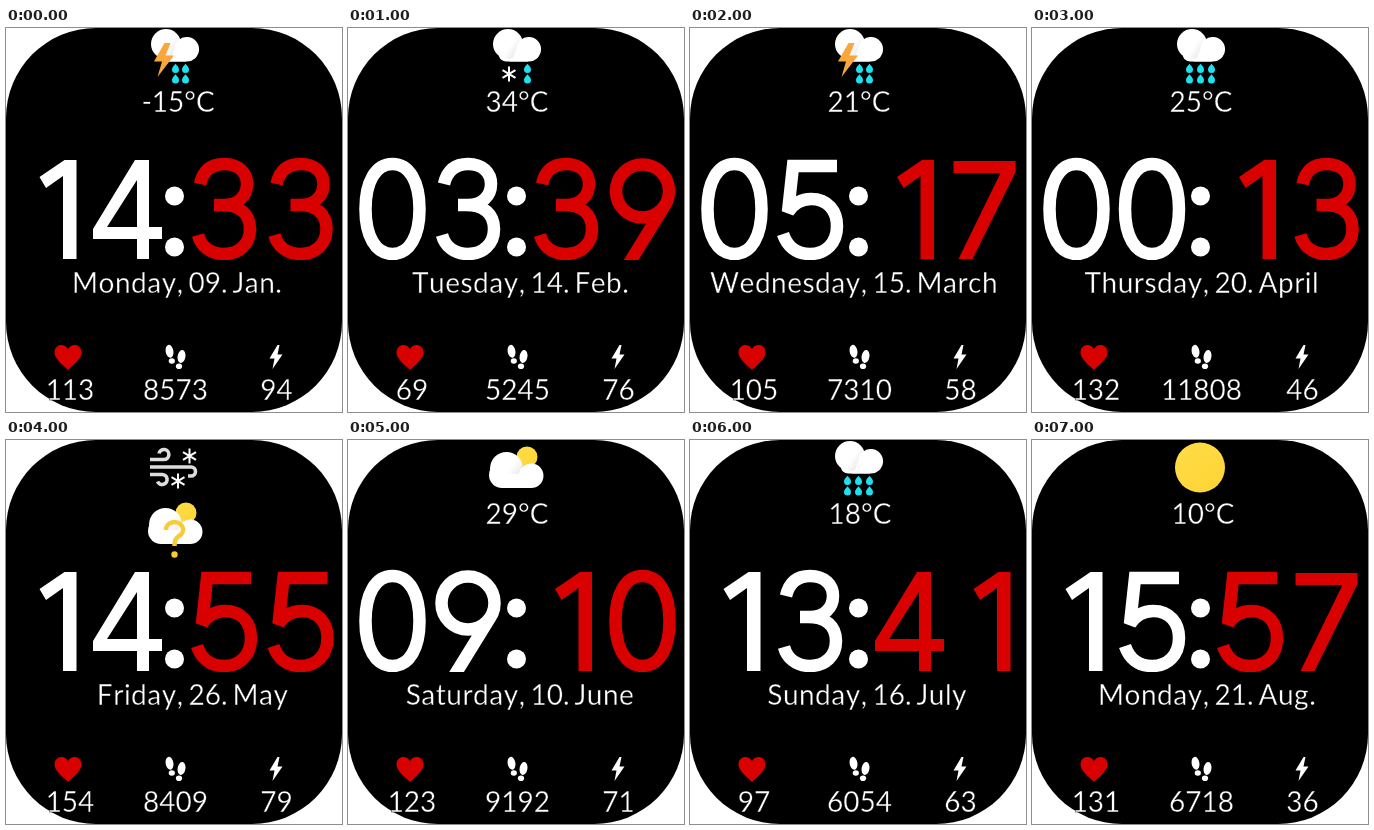
Write an HTML page that moves like this. It is 336 px wide and 384 px high and loops after 8000 ms.

```html
<!DOCTYPE html>
<html lang="en">
<head>
<meta charset="utf-8">
<title>Watch face</title>
<style>
  html, body { margin: 0; width: 100%; height: 100%; overflow: hidden; background: #fff; }
  svg { display: block; width: 336px; height: 384px; }
  /* the black outline thins the strokes a little */
  text { font: 28px Lato, sans-serif; font-kerning: none; fill: #fff; stroke: #000; stroke-width: .35px; }
  .mid { text-anchor: middle; }
  .end { text-anchor: end; }
  .word { letter-spacing: .5px; }
  .line { fill: none; stroke: currentColor; stroke-width: 12.5; }
  .solid { fill: currentColor; fill-rule: evenodd; }
  .state { visibility: hidden; animation: show 8s step-end infinite; }
  @keyframes show {
    0% { visibility: visible; }
    12.5%, 100% { visibility: hidden; }
  }
</style>
</head>
<body>
<svg viewBox="0 0 336 384">
  <defs>
    <linearGradient id="sun" x1="0" y1="0" x2="1" y2="1">
      <stop offset="0" stop-color="#ffdd48"/><stop offset="1" stop-color="#fdd433"/>
    </linearGradient>
    <linearGradient id="puff" x1="0" y1="0" x2="1" y2=".7">
      <stop offset=".65" stop-color="#fff"/><stop offset="1" stop-color="#e4e4e4"/>
    </linearGradient>
    <clipPath id="band"><rect y="128" width="336" height="104"/></clipPath>
    <path id="drop" d="M0-4.8C1.6-2.8 3.5-1.2 3.5 1A3.5 3.5 0 0 1-3.5 1C-3.5-1.2-1.6-2.8 0-4.8Z" fill="#1ce2f0"/>
    <path id="flake" d="M0-7.5V7.5M-6.5-3.8 6.5 3.8M-6.5 3.8 6.5-3.8" stroke="#fff" stroke-width="2"/>
    <g id="cloud">
      <path d="M158 18h22v15.5h-22a8 8 0 0 1-7-5z" fill="#fff"/>
      <circle cx="160" cy="16" r="15" fill="url(#puff)"/>
      <path d="M160 33.5c6 0 4-4 8.5-12.5A12.3 12.3 0 1 1 180 33.5Z" fill="#fff"/>
    </g>
    <g id="sunny">
      <circle cx="179" cy="17" r="10.5" fill="url(#sun)"/>
      <circle cx="154" cy="35" r="13" fill="#fff"/>
      <circle cx="158.5" cy="28.5" r="16.5" fill="url(#puff)"/>
      <path d="M154 48V34h17a12.3 12.3 0 1 1 12 14Z" fill="#fff"/>
    </g>
  </defs>

  <rect width="336" height="384" rx="90"/>
  <path d="M62 342C57 337 48.5 331 48.5 324.5C48.5 316 58.5 314.5 62 321C65.5 314.5 75.5 316 75.5 324.5C75.5 331 67 337 62 342Z" fill="#d90000"/>
  <g fill="#fff">
    <ellipse cx="163.5" cy="323.3" rx="3.9" ry="6.5" transform="rotate(-10 163.5 323.3)"/>
    <ellipse cx="165.8" cy="333" rx="3.1" ry="2.8"/>
    <ellipse cx="175.5" cy="328.5" rx="3.9" ry="6.5" transform="rotate(10 175.5 328.5)"/>
    <ellipse cx="173" cy="338.3" rx="3.1" ry="2.8"/>
    <path d="M271.5 317 263.5 330.5h5l-2 10.5 10-14.5h-5l2-9.5Z"/>
    <circle cx="168.5" cy="168" r="9.5"/>
    <circle cx="168.5" cy="219" r="9.5"/>
  </g>
  <g id="states"></g>
</svg>
<script>
// Numerals are drawn around their own centre.
const glyphs = {
  0: ['line', 'M0-45C17-45 27-27 27 0S17 45 0 45-27 27-27 0-17-45 0-45Z'],
  1: ['solid', 'M-11-32 14-49H26V50H12.5V-33L-4.5-21Z'],
  3: ['line', 'M-24-25C-21-38-13-45 0-45 15-45 23-36 23-25 23-13 14-4 0-4H-10H-2C16-4 26 5 26 20 26 35 15 45 0 45-14 45-23 37-26 26'],
  4: ['solid', 'M9-49H23V18H36V30H23V50H11V30H-33V20ZM11 18V-29L-19 18Z'],
  5: ['line', 'M27-43H-17L-22 3C-16-6-8-10 1-10 18-10 27 2 27 17 27 34 16 45 0 45-14 45-23 37-27 25'],
  7: ['solid', 'M-31-48H31V-37L-12 50H-26L16-36H-31Z'],
  9: ['line', 'M26.5-18A26.5 26.5 0 1 1-26.5-18 26.5 26.5 0 1 1 26.5-18M22.5-4-17 60']
};
const centers = [44.5, 120, 218, 294.5];

const use = (id, x = 0, y = 0) => `<use href="#${id}" x="${x}" y="${y}"/>`;
const drops = (...xs) => xs.map(x => use('drop', x, 40.5) + use('drop', x, 51)).join('');
const icons = {
  storm: use('cloud') + drops(169.5, 179.5) +
    '<path d="M158.5 15 148 33.5h8l-4.5 15.5 16.500-21.500h-8.500l5-12.500Z" fill="#f9a63a"/>',
  sleet: use('cloud') + use('flake', 161, 46) + drops(179.5),
  rain: use('cloud') + drops(157.5, 168.5, 179.5),
  partly: use('sunny'),
  sun: '<circle cx="168" cy="27.5" r="25" fill="url(#sun)"/>',
  unknown: `<path d="M144 19.5H158a5 5 0 1 0-5-6M144 27H185a4.5 4.5 0 0 1 0 9h-3M144 34.5H156a5 5 0 1 1-4.5 7"
      fill="none" stroke="#ddd" stroke-width="3.6"/>` +
    use('flake', 183.5, 16) + use('flake', 172, 41) + use('sunny', 1, 56) +
    `<path d="M160 90a8.500 7.500 0 1 1 13 6C169 99 168.500 101 168.500 106" fill="none" stroke="#f8cb3a" stroke-width="4.500"/>
     <circle cx="168.500" cy="114.500" r="3.200" fill="#f8cb3a"/>`
};

// icon, temperature, its centre, time, weekday, day, month, pulse, steps, charge
const states = [
  ['storm', '-15°C', 172, '1433', 'Monday', '09', 'Jan.', 113, 8573, 94],
  ['sleet', '34°C', 169, '0339', 'Tuesday', '14', 'Feb.', 69, 5245, 76],
  ['storm', '21°C', 169, '0517', 'Wednesday', '15', 'March', 105, 7310, 58],
  ['rain', '25°C', 169, '0013', 'Thursday', '20', 'April', 132, 11808, 46],
  ['unknown', '', 169, '1455', 'Friday', '26', 'May', 154, 8409, 79],
  ['partly', '29°C', 169, '0910', 'Saturday', '10', 'June', 123, 9192, 71],
  ['rain', '18°C', 170, '1341', 'Sunday', '16', 'July', 97, 6054, 63],
  ['sun', '10°C', 171, '1557', 'Monday', '21', 'Aug.', 131, 6718, 36]
];

const label = (x, y, str, cls = 'mid') => `<text x="${x}" y="${y}" class="${cls}">${str}</text>`;
const numeral = (n, i) => {
  const [cls, d] = glyphs[n];
  return `<path class="${cls}" color="${i < 2 ? '#fff' : '#d90000'}" transform="translate(${centers[i]} 181)" d="${d}"/>`;
};

document.getElementById('states').innerHTML = states.map(
  ([icon, temp, tempX, time, weekday, day, month, pulse, steps, charge], i) =>
    `<g class="state" style="animation-delay:${i - states.length}s">
      ${icons[icon]}
      ${label(tempX, 84, temp)}
      <g clip-path="url(#band)">${[...time].map(numeral).join('')}</g>
      ${label(177.5, 265, weekday + ',', 'word end')}
      ${label(182.5, 265, day + '.', '')}
      ${label(226.5, 265, month, 'word')}
      ${label(64, 372, pulse)}
      ${label(169.5, 372, steps)}
      ${label(270.5, 372, charge)}
    </g>`
).join('');
</script>
</body>
</html>
```
